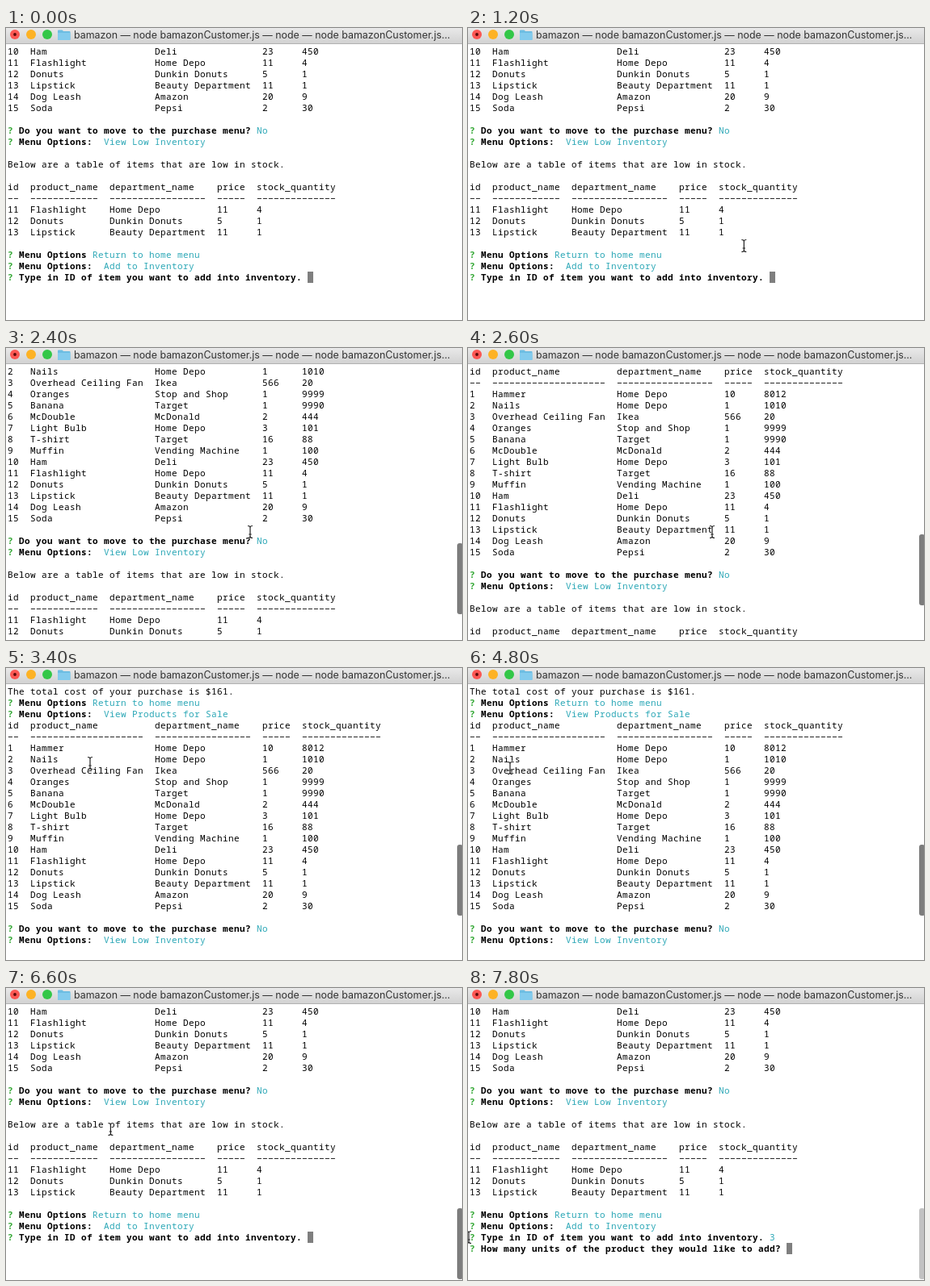
Recreate the animation shown at these times as an HTML page. Size 564 by 362 pixels, loop 8000 ms.

```html
<!DOCTYPE html>
<html lang="en">
<head>
<meta charset="utf-8">
<title>Terminal</title>
<style>
  html, body { margin: 0; width: 100%; height: 100%; overflow: hidden; background: #fff; }
  svg, pre { position: absolute; margin: 0; }
  svg { left: 0; top: 0; }
  pre {
    left: 2px; top: 22px; height: 336px; overflow: hidden; color: #000;
    font: 11px/14px "Noto Sans Mono", monospace;
    letter-spacing: calc(7px - 1ch);
  }
  .mark { color: #35a836; font-weight: bold; }
  .answer { color: #2ba7b6; }
  .block { display: inline-block; width: 7px; height: 14px; background: #7f7f7f; vertical-align: top; }
</style>
</head>
<body>
<pre id="screen"></pre>
<svg width="564" height="362" viewBox="0 0 564 362">
  <defs>
    <linearGradient id="bar" x2="0" y2="1">
      <stop stop-color="#e9e9e9"/><stop offset="1" stop-color="#d2d2d2"/>
    </linearGradient>
    <path id="beam" fill="none" d="M-3-7.5Q0-7.5 0-5.5Q0-7.5 3-7.5M0-5.5V5.5M-3 7.5Q0 7.5 0 5.5Q0 7.5 3 7.5M-1.7 3H1.7"/>
  </defs>
  <rect width="564" height="19" fill="url(#bar)"/>
  <rect y="19" width="564" height="1" fill="#b1b1b1"/>
  <circle cx="11" cy="8" r="6" fill="#fc5753"/>
  <circle cx="11" cy="8" r="1.9" fill="#5a0a08"/>
  <circle cx="31" cy="8" r="6" fill="#fdb225"/>
  <circle cx="51" cy="8" r="6" fill="#33c748"/>
  <path d="M64 3.5q0-1 1-1h4.5l1.5 1.5h7.5q1 0 1 1v9q0 1-1 1H65q-1 0-1-1z" fill="#6dbde2"/>
  <path d="M64 6h15.5v8q0 1-1 1H65q-1 0-1-1z" fill="#83cbed"/>
  <text x="84" y="13" fill="#333" font-family="Inter, sans-serif" font-size="12.42">bamazon — node bamazonCustomer.js — node — node bamazonCustomer.js...</text>
  <rect id="thumb" x="558" width="7" height="88" rx="3"/>
  <g id="pointer">
    <use href="#beam" stroke="#fff" stroke-width="2.6" opacity=".8"/>
    <use href="#beam" stroke="#222" stroke-width="1.2"/>
  </g>
</svg>
<script>
const LOOP = 8000, STEP = 200, ROWS = 24;
const $ = id => document.getElementById(id);

const products = `Hammer,Home Depo,10,8012
Nails,Home Depo,1,1010
Overhead Ceiling Fan,Ikea,566,20
Oranges,Stop and Shop,1,9999
Banana,Target,1,9990
McDouble,McDonald,2,444
Light Bulb,Home Depo,3,101
T-shirt,Target,16,88
Muffin,Vending Machine,1,100
Ham,Deli,23,450
Flashlight,Home Depo,11,4
Donuts,Dunkin Donuts,5,1
Lipstick,Beauty Department,11,1
Dog Leash,Amazon,20,9
Soda,Pepsi,2,30`.split("\n").map((line, i) => [String(i + 1), ...line.split(",")]);

function table(rows) {
  const all = [["id", "product_name", "department_name", "price", "stock_quantity"], ...rows];
  const widths = all[0].map((_, c) => Math.max(...all.map(row => row[c].length)));
  all.splice(1, 0, widths.map(w => "−".repeat(w)));
  return all.map(row => row.map((cell, c) => cell.padEnd(widths[c] + 2)).join("").trimEnd());
}

const prompt = (question, answer) =>
  `<span class="mark">?</span> <b>${question}</b> <span class="answer">${answer}</span>`;
const block = '<span class="block"></span>';

const history = [
  "The total cost of your purchase is $161.",
  prompt("Menu Options", "Return to home menu"),
  prompt("Menu Options:", " View Products for Sale"),
  ...table(products),
  "",
  prompt("Do you want to move to the purchase menu?", "No"),
  prompt("Menu Options:", " View Low Inventory"),
  "",
  "Below are a table of items that are low in stock.",
  "",
  ...table(products.slice(10, 13)),
  "",
  prompt("Menu Options", "Return to home menu"),
  prompt("Menu Options:", " Add to Inventory")
];

// Keys: time, then values
const scrollKeys = [[1600, 14], [1800, 10], [2400, 6], [2800, 0], [5600, 0], [6000, 3], [6400, 14]];
const pointerKeys = [
  [800, 420, 354], [1400, 302, 228], [2800, 302, 228], [3400, 104, 118], [4800, 52, 124],
  [5200, 52, 124], [6000, 160, 139], [6400, 160, 139], [7400, 7, 319], [7800, 1, 309]
];

function valuesAt(keys, t) {
  const next = keys.findIndex(key => key[0] > t);
  if (next < 0) return keys[keys.length - 1].slice(1);
  if (next === 0) return keys[0].slice(1);
  const a = keys[next - 1], b = keys[next], k = (t - a[0]) / (b[0] - a[0]);
  return a.slice(1).map((v, i) => v + (b[i + 1] - v) * k);
}

function draw(t) {
  const top = Math.round(valuesAt(scrollKeys, t)[0]);
  const [x, y] = valuesAt(pointerKeys, t);
  const entered = t >= 7800;
  const lines = [...history, prompt("Type in ID of item you want to add into inventory.",
    (t >= 7400 ? "3" : "") + (entered ? "" : block))];
  if (entered) lines.push(prompt("How many units of the product they would like to add?", block));

  $("screen").innerHTML = lines.slice(top, top + ROWS).join("\n");
  $("thumb").setAttribute("y", Math.round(219 + top * 3.85));
  $("thumb").setAttribute("fill", entered ? "#c2c2c2" : "#7d7d7d");
  $("thumb").setAttribute("visibility", t < 1800 ? "hidden" : "visible");
  $("pointer").setAttribute("transform", `translate(${x} ${y})`);
  $("pointer").setAttribute("visibility", t < 800 ? "hidden" : "visible");
}

let shown = -1;
function tick() {
  const t = Math.floor(performance.now() % LOOP / STEP) * STEP;
  if (t !== shown) draw(shown = t);
  requestAnimationFrame(tick);
}
tick();
</script>
</body>
</html>
```
